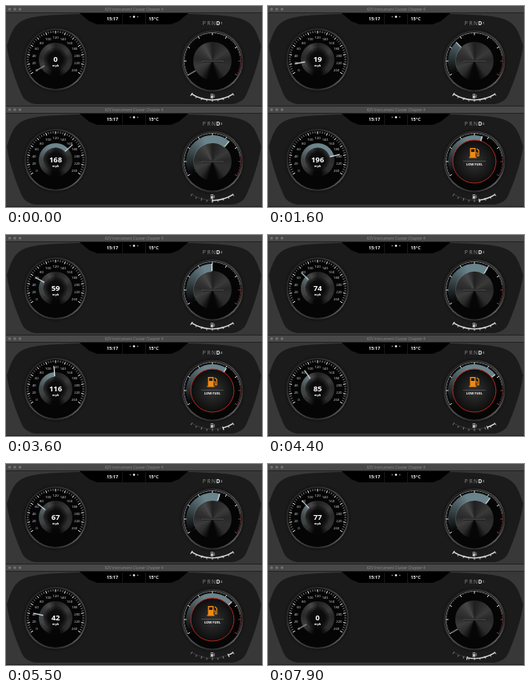
These frames come from a looping animation (320 px wide and 252 px high, 8000 ms). An HTML page with a canvas:

```html
<!DOCTYPE html>
<html lang="en">
<head>
<meta charset="utf-8">
<title>Instrument cluster</title>
<style>
html, body { margin: 0; width: 100%; height: 100%; overflow: hidden; background: #1b1b1b; }
canvas { display: block; width: 320px; height: 252px; }
</style>
</head>
<body>
<canvas id="stage" width="320" height="252"></canvas>
<script>
const c = document.getElementById('stage').getContext('2d');
const LOOP = 8;
const FONT = '"Open Sans", "Noto Sans", sans-serif';
const SPEEDO = [62, 67], TACHO = [258, 69];
const IDLE = -120, REV_LIMIT = 174, SHIFT_WIDTH = 4;
const RATIOS = [4, 2.03, 1.31, .95, .7];

// Key points are [seconds, mph].
const upper = {
  speed: [[0, 0], [.3, 0], [1.6, 19], [2.7, 41], [4.65, 79], [6.5, 53], [8, 79]],
  fuel: () => -32
};
const lower = {
  speed: [[0, 168], [1.6, 196], [2.7, 151], [4.4, 85], [5.5, 42], [6.5, 0]],
  fuel: t => Math.min(t * 4.4, 28 - (t - 6.35) * 25)
};

function at(track, t) {
  const i = track.findIndex(k => k[0] > t);
  if (i < 0) return track[track.length - 1][1];
  const [t0, a] = track[i - 1], [t1, b] = track[i];
  return a + (b - a) * (t - t0) / (t1 - t0);
}
const clamp = x => Math.max(0, Math.min(1, x));
const smooth = x => clamp(x) ** 2 * (3 - 2 * clamp(x));

// Each gear hands over to the next, longer one at the rev limit.
function revs(speed) {
  const ratio = RATIOS.reduce((from, to, i) => {
    const limit = REV_LIMIT / RATIOS[i - 1];
    return from + (to - from) * smooth((speed - limit) / SHIFT_WIDTH);
  });
  return IDLE + speed * ratio;
}

const rad = deg => (deg - 90) * Math.PI / 180;
const polar = ([x, y], r, deg) => [x + r * Math.cos(rad(deg)), y + r * Math.sin(rad(deg))];

function text(s, x, y, size, color = '#fff', weight = 400) {
  c.font = `${weight} ${size}px ${FONT}`;
  c.fillStyle = color;
  c.textAlign = 'center';
  c.fillText(s, x, y);
}
function disc([x, y], r, fill) {
  c.beginPath();
  c.arc(x, y, r, 0, 7);
  c.fillStyle = fill;
  c.fill();
}
function arc([x, y], r, from, to, color, width) {
  c.beginPath();
  c.arc(x, y, r, rad(from), rad(to));
  c.strokeStyle = color;
  c.lineWidth = width;
  c.stroke();
}
function spoke(o, r0, r1, deg, color, width) {
  c.beginPath();
  c.moveTo(...polar(o, r0, deg));
  c.lineTo(...polar(o, r1, deg));
  c.strokeStyle = color;
  c.lineWidth = width;
  c.stroke();
}
function shape(points, fill) {
  c.beginPath();
  points.forEach(p => c.lineTo(...p));
  c.closePath();
  c.fillStyle = fill;
  c.fill();
}
function conic(o, stops) {
  const g = c.createConicGradient(rad(0), ...o);
  stops.forEach((color, i) => g.addColorStop(i / (stops.length - 1), color));
  return g;
}
function radial([x, y], r0, r1, from, to) {
  const g = c.createRadialGradient(x, y, r0, x, y, r1);
  g.addColorStop(0, from);
  g.addColorStop(1, to);
  return g;
}
function sweep(o, r0, r1, deg) {
  if (deg <= IDLE) return;
  const g = c.createConicGradient(rad(IDLE), ...o);
  g.addColorStop(0, 'rgba(112,138,146,0)');
  g.addColorStop(.28, 'rgba(112,138,146,.95)');
  arc(o, (r0 + r1) / 2, IDLE, deg, g, r1 - r0);
}
function bezel(o, r) {
  disc(o, r + 5, radial(o, r - 1, r + 5, '#101010', 'rgba(27,27,27,0)'));
  disc(o, r, conic(o, ['#2a2a2a', '#484848', '#2c2c2c', '#5c5c5c', '#282828', '#4a4a4a', '#2a2a2a', '#262626', '#2a2a2a']));
  disc(o, r - 2, '#050505');
}
function metal(o, r) {
  disc(o, r, conic(o, ['#202020', '#2c2c2c', '#3a3a3a', '#282828', '#303030', '#2c2c2c', '#060606',
    '#060606', '#2c2c2c', '#3c3c3c', '#2a2a2a', '#343434', '#474747', '#202020']));
}
function needle(o, r0, r1, deg) {
  const color = deg > IDLE ? '#e8eeee' : '#8c8c8c';
  spoke(o, r0, r1, deg, 'rgba(170,190,195,.25)', 2.4);
  spoke(o, r0, r1, deg, color, 1);
}

function housing() {
  c.fillStyle = '#383838';
  c.fillRect(0, 0, 320, 126);
  c.beginPath();
  c.moveTo(90, 10);
  c.lineTo(230, 10);
  c.bezierCurveTo(305, 12, 308, 16, 319, 50);
  c.bezierCurveTo(316, 72, 307, 96, 300, 112);
  c.quadraticCurveTo(296, 121, 283, 123);
  c.lineTo(37, 123);
  c.quadraticCurveTo(24, 121, 20, 112);
  c.bezierCurveTo(13, 96, 4, 72, 1, 50);
  c.bezierCurveTo(12, 16, 15, 12, 90, 10);
  c.fillStyle = '#1b1b1b';
  c.fill();

  c.fillStyle = '#484848';
  c.fillRect(0, 0, 320, 8);
  c.fillStyle = '#222';
  c.fillRect(0, 8, 320, 1);
  c.fillRect(0, 125, 320, 1);
  for (const x of [4.5, 11, 17.5]) disc([x, 4], 1.8, '#707070');
  text('KZV Instrument Cluster Chapter 4', 160, 5.8, 4.7, '#8c8c8c');

  shape([[92, 9], [228, 9], [216, 19], [206, 23], [114, 23], [104, 19]], '#000');
  c.fillStyle = '#2c2c2c';
  c.fillRect(145.5, 10, .6, 13);
  c.fillRect(174, 10, .6, 13);
  text('15:17', 133, 18.3, 5.7, '#eee', 700);
  text('15°C', 184.5, 18.3, 5.7, '#eee', 700);
  for (const i of [-1, 0, 1]) disc([160 + i * 4.7, 13.5], i ? .8 : 1.3, i ? '#999' : '#fff');
}

function speedometer(speed) {
  const deg = IDLE + speed;
  bezel(SPEEDO, 39);
  for (let v = 0; v <= 240; v += 5) {
    const major = v % 20 === 0;
    spoke(SPEEDO, major ? 32.5 : 33.5, 36, IDLE + v, major ? '#f0f0f0' : '#bbb', major ? 1 : .7);
  }
  for (let v = 0; v <= 240; v += 20) {
    const [x, y] = polar(SPEEDO, 27.3, IDLE + v);
    text(v === 240 ? 260 : v, x, y + 1.6, 4.3, '#ddd');
  }
  metal(SPEEDO, 21);
  sweep(SPEEDO, 15.5, 21, deg);
  disc(SPEEDO, 15, radial(SPEEDO, 9, 15, '#0b0b0b', 'rgba(11,11,11,.2)'));
  needle(SPEEDO, 16, 28.5, deg);
  text(Math.round(speed), 62, 69.9, 9.4, '#fff', 700);
  text('mph', 62, 76, 3.8, '#fff', 700);
}

function pump(x, y, s, color) {
  c.save();
  c.translate(x, y);
  c.scale(s, s);
  c.fillStyle = color;
  c.fillRect(-5, -6, 7, 11);
  c.fillRect(-6, 5, 9, 1.5);
  c.fillStyle = '#171717';
  c.fillRect(-3.6, -4.5, 4.2, 3.4);
  c.beginPath();
  c.moveTo(2, 0);
  c.lineTo(4, 0);
  c.lineTo(4, 4);
  c.lineTo(6, 4);
  c.lineTo(6, -3);
  c.lineTo(3.5, -5);
  c.strokeStyle = color;
  c.lineWidth = 1.1;
  c.stroke();
  c.restore();
}

function tachometer(deg, warning) {
  bezel(TACHO, 38.5);
  for (let a = IDLE; a <= 120; a += 6) {
    const major = a % 30 === 0;
    const color = a > 78 ? '#864848' : major ? '#eee' : '#888';
    spoke(TACHO, major ? 32.5 : 34.3, 35.7, a, color, major ? 1 : .5);
  }
  arc(TACHO, 35.6, IDLE, 80, '#aaa', .6);
  arc(TACHO, 35.6, 80, 120, '#804040', .6);
  metal(TACHO, 24);
  sweep(TACHO, 23, 33, deg);
  shape([[243, 68.6], [258, 67.8], [273, 68.6], [270, 70.6], [246, 70.6]], '#171717');
  c.fillStyle = '#777';
  c.fillRect(244, 68.7, 28, .7);
  needle(TACHO, 24, 33, deg);

  c.globalAlpha = warning;
  disc(TACHO, 27, radial(TACHO, 6, 27, '#2a2a2a', '#0d0d0d'));
  arc(TACHO, 27, 0, 360, '#c92a1f', .9);
  pump(257.5, 58, 1, '#f28a13');
  c.fillStyle = '#777';
  c.fillRect(244, 68.5, 28, .5);
  text('LOW FUEL', 258, 73.7, 4.1, '#fff', 700);
  c.globalAlpha = 1;
}

function fuelGauge(level) {
  arc(TACHO, 48.5, 148, 212, '#555', .5);
  for (let a = -32; a <= 32; a += 8) {
    spoke(TACHO, a % 16 ? 48.5 : 47.5, 51, 180 - a, a < level ? '#999' : '#eee', .8);
  }
  arc(TACHO, 48.8, 148, 180 - level, '#ddd', 1.3);
  spoke(TACHO, 47, 51.5, 180 - level, '#fff', .9);
  pump(258, 112.8, .43, '#ccc');
}

function gears(gear) {
  [...'PRND'].forEach((letter, i) => {
    const drive = letter === 'D';
    text(letter, 247.8 + i * 5.8, 24.2, 6.7, drive ? '#e6f1f2' : '#8b8b8b', drive ? 700 : 400);
  });
  text(gear, 269.4, 23.4, 3.4, '#c7d5d7', 600);
}

function cluster(y, car, t) {
  const speed = at(car.speed, t), level = car.fuel(t);
  c.save();
  c.translate(0, y);
  housing();
  speedometer(speed);
  tachometer(revs(speed), clamp(level - 3.5));
  fuelGauge(level);
  gears(Math.min(6, 1 + Math.floor(speed / 35)));
  c.restore();
}

function draw(now) {
  const t = now / 1000 % LOOP;
  cluster(0, upper, t);
  cluster(126, lower, t);
  requestAnimationFrame(draw);
}
requestAnimationFrame(draw);
</script>
</body>
</html>
```
